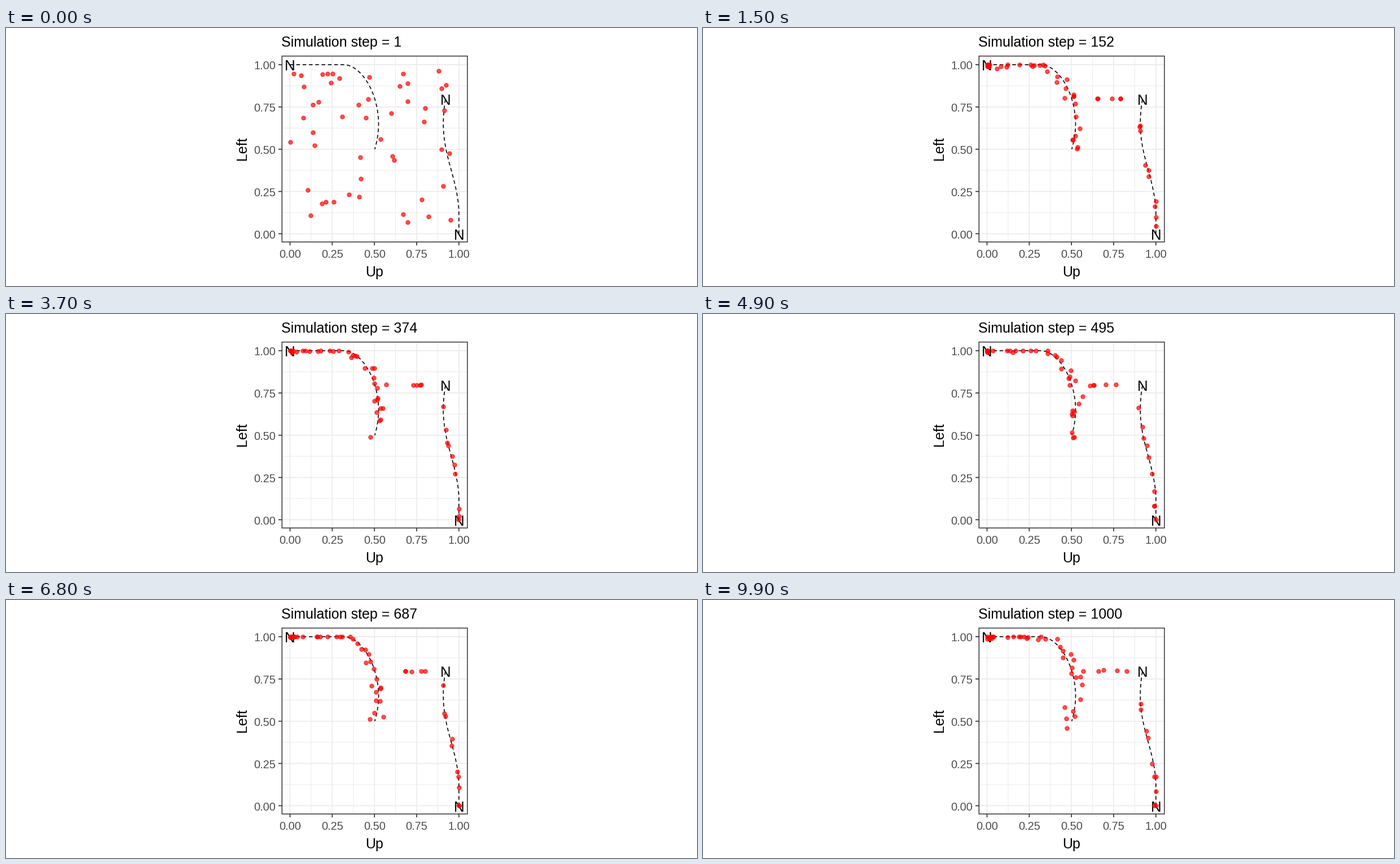
These frames come from a looping animation (1225x457 px, 10 s). A matplotlib script:

```python
import numpy as np
import matplotlib.pyplot as plt
from matplotlib.animation import FuncAnimation

W, H, DPI = 1225, 457, 64
PT = 72 / DPI  # points per pixel
FRAMES, STEPS, AGENTS = 100, 1000, 50
X0, Y0, UNIT = 503.5, 364.4, 299.4
LEFT, RIGHT, TOP, BOTTOM = 489, 818, 50, 379
GREY, GRID, LABEL = "#333333", "#EBEBEB", "#4D4D4D"

plt.rcParams["font.family"] = "Liberation Sans"
rng = np.random.default_rng(12)


def px(x):
    return X0 + UNIT * np.asarray(x)


def py(y):
    return Y0 - UNIT * np.asarray(y)


def bezier(a, b, c, d, n=16):
    t = np.linspace(0, 1, n)[:, None]
    a, b, c, d = map(np.array, (a, b, c, d))
    return (1-t)**3 * a + 3*t*(1-t)**2 * b + 3*t**2*(1-t) * c + t**3 * d


# Equilibrium branches
MAIN = np.vstack([(0, 1), bezier((.32, 1), (.44, 1), (.58, .75), (.502, .5))])
SIDE = np.vstack([bezier((.92, .795), (.87, .5), (.985, .38), (1, .14)),
                  (1, 0)])
FLAT = np.array([(.57, .797), (.86, .797)])


def drift_noise(n, rho=.75):
    """Unit-variance correlated noise, one row per frame."""
    out = rng.normal(size=(FRAMES, n))
    for i in range(1, FRAMES):
        out[i] = rho * out[i - 1] + np.sqrt(1 - rho**2) * out[i]
    return out


def along(path, u):
    seg = np.hypot(*np.diff(path, axis=0).T)
    s = np.r_[0, np.cumsum(seg)] / seg.sum()
    return np.stack([np.interp(u, s, path[:, k]) for k in (0, 1)], axis=-1)


def travel(start, path, lo, hi, wander, spread, flare=0, drift=0):
    """Positions of one group: decay onto the branch, then wander along it."""
    n = len(start)
    t = np.linspace(0, 1, FRAMES)[:, None]
    u = rng.permutation(np.linspace(lo, hi, n)) + drift * t
    u = u + wander * drift_noise(n)
    scale = spread + flare * np.clip(u, 0, 1)
    jitter = np.stack([drift_noise(n), drift_noise(n)], axis=-1)
    goal = along(path, u) + scale[..., None] * jitter
    decay = np.exp(-t * STEPS / 30)[..., None]
    return np.clip(goal + (start - goal) * decay, 0, 1)


# Rightmost agents split by height between the two right-hand branches
start = rng.random((AGENTS, 2))
start = start[np.argsort(start[:, 0])]
main, right = start[:35], start[35:]
right = right[np.argsort(right[:, 1])]
dots = np.concatenate([
    travel(main, MAIN, -.17, 1, .04, .008, flare=.018),
    travel(right[10:], FLAT, .2, .8, .15, .002),
    travel(right[:10], SIDE, .1, .98, .06, .005, drift=.15),
], axis=1)

fig = plt.figure(figsize=(W / DPI, H / DPI), dpi=DPI, facecolor="white")
ax = fig.add_axes([0, 0, 1, 1])
ax.set_xlim(0, W)
ax.set_ylim(H, 0)
ax.axis("off")


def line(x, y, color, width, z=1, **kw):
    ax.plot(x, y, color=color, lw=width * PT, zorder=z, snap=False,
            solid_capstyle="butt", dash_capstyle="butt", **kw)


def text(x, y, s, size, color="black", z=4, **kw):
    return ax.text(x, y, s, fontsize=size * PT, color=color, zorder=z,
                   va=kw.pop("va", "baseline"), **kw)


def cross(v, width):
    line([px(v)] * 2, [TOP, BOTTOM], GRID, width)
    line([LEFT, RIGHT], [py(v)] * 2, GRID, width)


for v in np.arange(.125, 1, .25):
    cross(v, 1)
for v in np.arange(0, 1.1, .25):
    x, y = px(v), py(v)
    cross(v, 1.7)
    line([x, x], [BOTTOM, BOTTOM + 6], GREY, 1.7)
    line([LEFT - 6, LEFT], [y, y], GREY, 1.7)
    text(x, 407, f"{v:.2f}", 20, LABEL, ha="center")
    text(478.5, y + 8.3, f"{v:.2f}", 20, LABEL, ha="right")

for path in (MAIN, SIDE):
    line(px(path[:, 0]), py(path[:, 1]), "black", 1.6, 2, ls=(0, (4, 3)))
for x, y in ((0, 1), (.922, .797), (1, 0)):
    text(px(x), py(y) + 10.3, "N", 26, z=3, ha="center")

ax.add_patch(plt.Rectangle((LEFT + .3, TOP - .3), RIGHT - LEFT - .3,
                           BOTTOM - TOP + .3, fill=False, edgecolor=GREY,
                           lw=1.5 * PT, zorder=6, snap=False))

text(653.2, 440, "Up", 25, ha="center")
text(431, 213.5, "Left", 25, rotation=90, ha="right", va="center")
title = text(488.5, 32.5, "", 25, ha="left")
cloud = ax.scatter([], [], s=(7.4 * PT)**2, facecolor=(1, 0, 0, .7),
                   edgecolor=(1, 0, 0, .7), linewidth=PT, zorder=5)


def draw(i):
    step = round(1 + i * (STEPS - 1) / (FRAMES - 1))
    title.set_text(f"Simulation step = {step}")
    cloud.set_offsets(np.column_stack([px(dots[i, :, 0]), py(dots[i, :, 1])]))
    return title, cloud


anim = FuncAnimation(fig, draw, frames=FRAMES, interval=100,
                     init_func=lambda: draw(0), repeat=True, repeat_delay=0)
plt.show()
```
